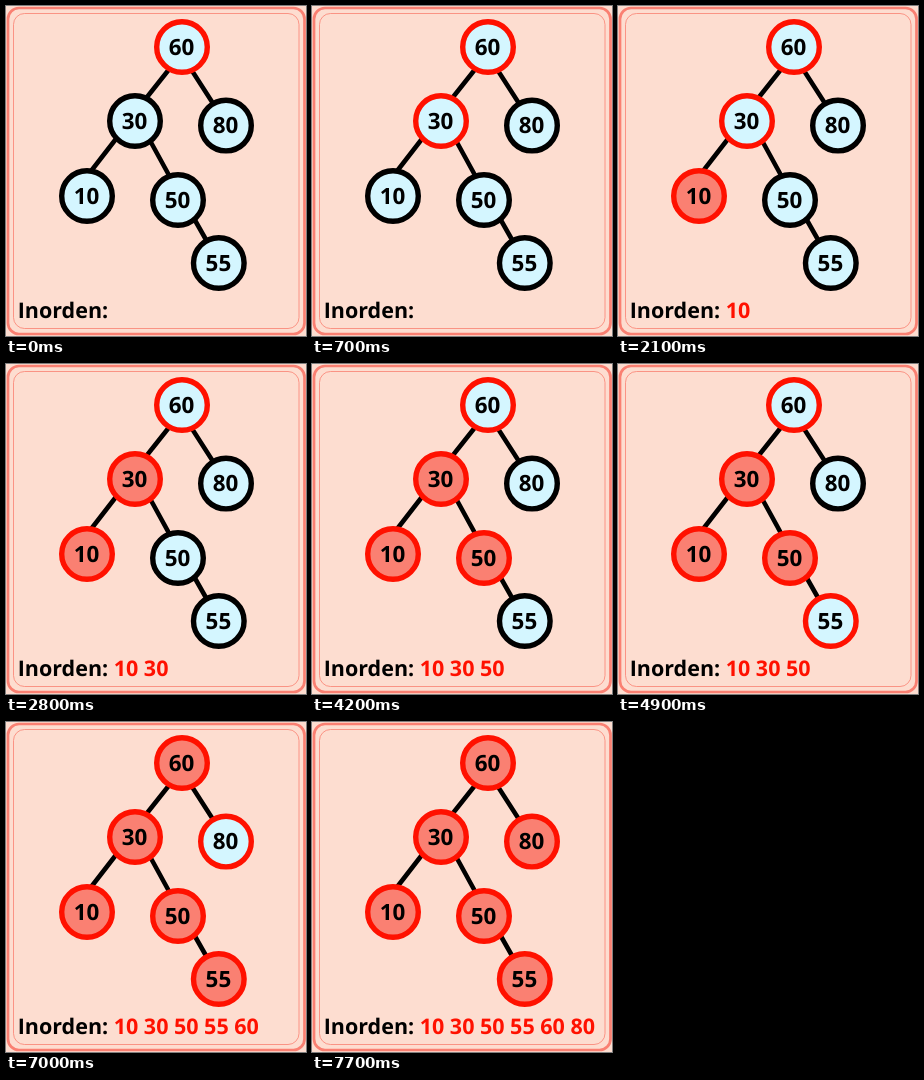
An HTML page for the animation above (8.4 s loop, 300 px wide and 330 px high).

```html
<!DOCTYPE html>
<html lang="es">
<head>
<meta charset="utf-8">
<style>
  html, body { margin: 0; width: 100%; height: 100%; overflow: hidden; background: #fdddd0; }
  svg { display: block; width: 300px; height: 330px; }
  text { font: bold 21.5px "Open Sans", "Noto Sans", sans-serif; text-rendering: geometricPrecision; }
  .node circle { fill: #d4f6ff; stroke: #000; stroke-width: 5.4; }
  .node text { font-size: 22.4px; text-anchor: middle; }
  .node.open circle { stroke: #ff1100; }
  .node.done circle { fill: #fa8072; }
  #out { fill: #ff1100; }
</style>
</head>
<body>
<svg viewBox="0 0 300 330">
  <g fill="none" stroke="#fa8072">
    <rect x="2" y="2" width="296.5" height="326" rx="11" stroke-width="2.7"/>
    <rect x="7.5" y="7.5" width="285.5" height="315" rx="11" stroke-width=".8"/>
  </g>
  <path d="M165.7 60L138.7 94M183.6 61L210.6 103M113 129L82 169M142.6 132L165.6 174M186 209L203 239"
        stroke="#000" stroke-width="4.6"/>
  <g id="tree"></g>
  <text x="11.7" y="312" xml:space="preserve">Inorden: <tspan id="out"></tspan></text>
</svg>
<script>
const STEP = 700;
// value, x, y, step when entered, step when visited
const nodes = [
  [60, 176, 41, 0, 9],
  [30, 129, 115, 1, 4],
  [10, 81, 190, 2, 3],
  [50, 172, 194, 5, 6],
  [55, 212.8, 257, 7, 8],
  [80, 220, 119.6, 10, 11]
];
const order = [...nodes].sort((a, b) => a[4] - b[4]);
const tree = document.getElementById('tree');
const out = document.getElementById('out');

tree.innerHTML = nodes.map(([v, x, y]) =>
  `<g class="node"><circle cx="${x}" cy="${y}" r="25.3"/><text x="${x - 0.4}" y="${y + 7.5}">${v}</text></g>`
).join('');

let shown = -1;
function draw(now) {
  const step = Math.floor(now / STEP) % 12;
  if (step !== shown) {
    shown = step;
    nodes.forEach(([, , , enter, visit], i) => {
      const { classList } = tree.children[i];
      classList.toggle('open', step >= enter);
      classList.toggle('done', step >= visit);
    });
    out.textContent = order.filter(n => step >= n[4]).map(n => n[0]).join(' ');
  }
  requestAnimationFrame(draw);
}
draw(performance.now());
</script>
</body>
</html>
```
